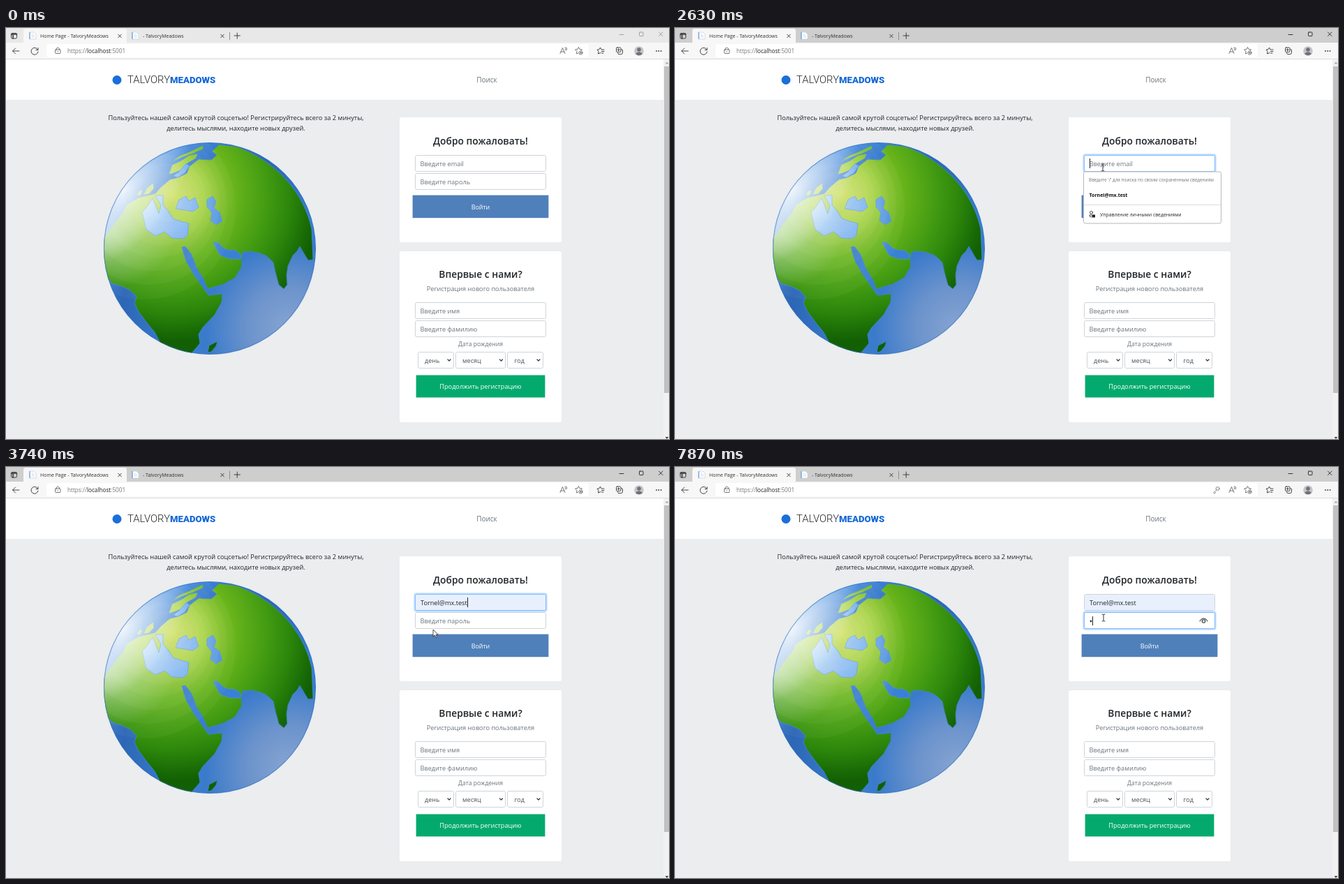
Write an HTML page that moves like this. It is 950 px wide and 589 px high and loops after 8 s.

```html
<!DOCTYPE html>
<html lang="ru">
<head>
<meta charset="utf-8">
<title>Home Page</title>
<style>
html, body { margin: 0; width: 100%; height: 100%; overflow: hidden; background: #fff; }
svg { display: block; width: 950px; height: 589px; }
text { font: 9.16px "Open Sans", "Noto Sans", sans-serif; fill: #212529; }
.mid { text-anchor: middle; }
.lead { font-size: 9.27px; }
.h { font-size: 13.8px; font-weight: 600; }
.grey, .ph { fill: #6c757d; }
.sel { fill: #495057; font-size: 9px; }
.tab { font-size: 7px; fill: #333; }
.box { fill: #fff; stroke: #ced4da; }
.ring { fill: none; stroke: #80bdff; }
.halo { fill: none; stroke: #007bff; stroke-opacity: .25; stroke-width: 1.8; }
.line { fill: none; stroke: #333; stroke-width: .9; stroke-linecap: round; stroke-linejoin: round; }
.caret { fill: #222; }

/* Everything switches on one shared eight-second clock. */
.k { animation: 8s step-end infinite; }
.strip { animation-name: strip; }
.caption { animation-name: caption; }
.arrow { animation-name: arrow; }
.beam { animation-name: beam; }
.glow { animation-name: glow; }
.pop { animation-name: pop; transform-origin: 684px 243px; }
.hover { animation-name: hover; }
.mailHint { animation-name: mailHint; }
.mailFill { animation-name: hover; }
.preview { animation-name: preview; }
.mail { animation-name: mail; }
.mailRing { animation-name: mailRing; }
.passRing { animation-name: passRing; }
.caretA { animation-name: caretA; }
.caretB { animation-name: caretB; }
.caretC { animation-name: caretC; }
.typed { animation-name: typed; }
.passHint { animation-name: passHint; }

@keyframes strip { 0% { fill: #e8e8e8 } 17.75%, 100% { fill: #cecece } }
@keyframes caption { 0% { stroke: #999 } 17.75%, 100% { stroke: #222 } }
@keyframes arrow {
  0% { opacity: 0; transform: translate(900px, 575px) }
  4.875% { opacity: 1; transform: translate(900px, 575px) }
  5.75% { opacity: 1; transform: translate(888px, 559px) }
  6.625% { opacity: 1; transform: translate(855px, 516px) }
  7.5% { opacity: 1; transform: translate(809px, 455px) }
  8.375% { opacity: 1; transform: translate(756px, 385px) }
  9.25% { opacity: 1; transform: translate(703px, 315px) }
  10.125% { opacity: 1; transform: translate(657px, 254px) }
  11% { opacity: 1; transform: translate(624px, 211px) }
  11.875% { opacity: 0; transform: translate(612px, 196px) }
  33.75% { opacity: 1; transform: translate(612px, 209px) }
  34.625% { opacity: 1; transform: translate(612px, 219px) }
  35.5% { opacity: 1; transform: translate(612px, 228px) }
  36.375% { opacity: 1; transform: translate(612px, 232px) }
  37.25% { opacity: 1; transform: translate(612px, 233px) }
  48.5%, 100% { opacity: 0; transform: translate(612px, 233px) }
}
@keyframes beam {
  0% { opacity: 0; transform: translate(613px, 196px) }
  11.875% { opacity: 1; transform: translate(613px, 196px) }
  32.875% { opacity: 1; transform: translate(613px, 200px) }
  33.75% { opacity: 0; transform: translate(613px, 200px) }
  48.5% { opacity: 1; transform: translate(613px, 226px) }
  49.375% { opacity: 1; transform: translate(614px, 220px) }
  50.25%, 100% { opacity: 1; transform: translate(614px, 216px) }
}
@keyframes glow {
  0% { opacity: 0; transform: translate(612px, 196px) }
  17.75% { opacity: 1; transform: translate(612px, 196px) }
  19.625% { opacity: 0; transform: translate(612px, 196px) }
  43.25% { opacity: 1; transform: translate(612px, 234px) }
  45% { opacity: 0; transform: translate(612px, 234px) }
  51.875% { opacity: 1; transform: translate(613px, 216px) }
  53.625%, 100% { opacity: 0; transform: translate(613px, 216px) }
}
@keyframes pop {
  0% { opacity: 0; transform: none }
  17.75% { opacity: 1; transform: none }
  45% { opacity: .66; transform: scale(.98) }
  45.875% { opacity: .2; transform: scale(.965) }
  46.75%, 100% { opacity: 0; transform: none }
}
@keyframes hover { 0% { opacity: 0 } 35.5%, 100% { opacity: 1 } }
@keyframes mailHint { 0% { opacity: 1 } 35.5%, 100% { opacity: 0 } }
@keyframes preview { 0% { opacity: 0 } 35.5% { opacity: 1 } 45%, 100% { opacity: 0 } }
@keyframes mail { 0% { opacity: 0 } 45%, 100% { opacity: 1 } }
@keyframes mailRing {
  0% { opacity: 0 } 18.625% { opacity: .5 } 19.625% { opacity: 1 }
  51.875% { opacity: .5 } 52.75% { opacity: .12 } 53.625%, 100% { opacity: 0 }
}
@keyframes passRing { 0% { opacity: 0 } 51.875% { opacity: .35 } 52.75% { opacity: .8 } 53.625%, 100% { opacity: 1 } }
@keyframes caretA {
  0% { opacity: 0 } 17.75% { opacity: 1 } 24.625% { opacity: 0 } 30.375% { opacity: 1 }
  38.125% { opacity: 0 } 43.25% { opacity: 1 } 45%, 100% { opacity: 0 }
}
@keyframes caretB { 0% { opacity: 0 } 45% { opacity: 1 } 51.875%, 100% { opacity: 0 } }
@keyframes caretC {
  0% { opacity: 0; transform: none } 51.875% { opacity: 1; transform: none }
  58.625% { opacity: 0; transform: none } 65.25% { opacity: 1; transform: none }
  71.875% { opacity: 0; transform: none } 78.5% { opacity: 1; transform: none }
  85.125% { opacity: 0; transform: none } 91.75% { opacity: 1; transform: none }
  98.375%, 100% { opacity: 1; transform: translate(4px, 0) }
}
@keyframes typed { 0% { opacity: 0 } 98.375%, 100% { opacity: 1 } }
@keyframes passHint { 0% { opacity: 1 } 98.375%, 100% { opacity: 0 } }
</style>
</head>
<body>
<svg viewBox="0 0 950 589">
<defs>
  <radialGradient id="sea" gradientUnits="userSpaceOnUse" cx="405" cy="430" r="300">
    <stop offset="0" stop-color="#86a4d2"/>
    <stop offset=".2" stop-color="#6b93cc"/>
    <stop offset=".4" stop-color="#3a7acb"/>
    <stop offset=".52" stop-color="#3a80d4"/>
    <stop offset=".8" stop-color="#2d66b5"/>
    <stop offset="1" stop-color="#3f87dc"/>
  </radialGradient>
  <radialGradient id="land" gradientUnits="userSpaceOnUse" cx="238" cy="238" r="212">
    <stop offset="0" stop-color="#c6dc48"/>
    <stop offset=".2" stop-color="#a3cf38"/>
    <stop offset=".42" stop-color="#68b41b"/>
    <stop offset=".62" stop-color="#469e13"/>
    <stop offset=".8" stop-color="#2c860b"/>
    <stop offset=".92" stop-color="#1b6e06"/>
    <stop offset="1" stop-color="#125f04"/>
  </radialGradient>
  <radialGradient id="lake" gradientUnits="userSpaceOnUse" cx="200" cy="250" r="130">
    <stop offset="0" stop-color="#b4d6fa"/>
    <stop offset=".5" stop-color="#78b0ee"/>
    <stop offset="1" stop-color="#3a80d4"/>
  </radialGradient>
  <radialGradient id="gloss" gradientUnits="userSpaceOnUse" cx="0" cy="0" r="1"
    gradientTransform="translate(168 232) rotate(-52) scale(125 70)">
    <stop offset="0" stop-color="#fff" stop-opacity=".9"/>
    <stop offset=".4" stop-color="#fff" stop-opacity=".55"/>
    <stop offset="1" stop-color="#fff" stop-opacity="0"/>
  </radialGradient>
  <radialGradient id="haze" gradientUnits="userSpaceOnUse" cx="0" cy="0" r="1"
    gradientTransform="translate(142 296) scale(100 78)">
    <stop offset="0" stop-color="#fff" stop-opacity=".5"/>
    <stop offset=".5" stop-color="#fff" stop-opacity=".25"/>
    <stop offset="1" stop-color="#fff" stop-opacity="0"/>
  </radialGradient>
  <clipPath id="ball"><circle cx="292" cy="316" r="152"/></clipPath>
  <path id="x" d="M-2.3-2.3 2.3 2.3M2.3-2.3-2.3 2.3"/>
  <path id="chev" class="line" d="M-2-1 0 1.2 2-1" style="stroke-width:1.2"/>
  <g id="doc">
    <path d="M-4-5H2L5-2V5H-4Z" fill="#fff" stroke="#c8ccd2" stroke-width=".7"/>
    <path d="M-4-5V5" stroke="#4a90d9"/><path d="M-1.5-2H1M-1.5 0H3M-1.5 2H3" stroke="#b9d3ee" stroke-width=".7"/>
  </g>
</defs>

<!-- browser frame -->
<rect class="k strip" width="950" height="21"/>
<path d="M25 21V4Q25 1 28 1H170Q173 1 173 4V21Z" fill="#f7f7f7"/>
<rect y="21" width="950" height="24" fill="#f7f7f7"/>
<path d="M0 44.5H950" stroke="#dcdcdc"/>
<g class="line">
  <rect x="7.5" y="7.5" width="8" height="7.5" rx="1.5"/><path d="M7.5 9H15.5M10 9V15" stroke-width="1.5"/>
  <use href="#x" x="163" y="11.5"/><use href="#x" x="310" y="11.5"/>
  <path d="M320.5 6V17" stroke="#888"/><path d="M327 11H335.5M331.25 7V15.25"/>
</g>
<use href="#doc" x="38" y="11"/><use href="#doc" x="185" y="11"/>
<text class="tab" x="49" y="13.5">Home Page - TalvoryMeadows</text>
<text class="tab" x="196" y="13.5">- TalvoryMeadows</text>
<g class="line k caption">
  <path d="M879 9.5H885"/><rect x="907.5" y="6" width="5.5" height="5.5" rx=".8"/>
  <path d="M935.5 6 941 11.5M941 6 935.5 11.5"/>
</g>
<rect x="58" y="23" width="777" height="19" rx="3" fill="#fff"/>
<g class="line">
  <path d="M19 33H9.5M13.5 29 9.5 33 13.5 37M45.5 31A5 5 0 1 0 46 34M46 28.5V31.5H43"/>
  <g stroke="#666"><rect x="70.5" y="31" width="7.5" height="5.5" rx="1"/><path d="M72 31V29.5Q74.25 26.5 76.5 29.5V31M74.25 33.5V34"/></g>
  <g stroke="#555" stroke-width=".8">
    <path d="M794 36.5 797.5 28.5 801 36.5M795.2 34H799.8M801 28Q803 29.5 801.5 31.5M802.5 27.5Q805 29.5 803 32"/>
    <path d="M824 32.5 825.5 31 822 30.5 820.5 27.5 819 30.5 815.5 31 818 33.5 817.5 37 819.5 36"/>
    <circle cx="823.5" cy="35.5" r="2.6"/><path d="M822.5 35.5H824.5M823.5 34.5V36.5"/>
  </g>
  <path d="M852 35.5 848.5 37 849 33.5 847 31.2 850 30.7 851.5 28 853 30.7M853.5 31H857M853.5 33.5H857M853.5 36H856"/>
  <rect x="874.5" y="28" width="6.5" height="6.5" rx="1.3"/>
  <path d="M882 30.5Q883.5 30.5 883.5 32V35.5Q883.5 37.5 881.5 37.5H878Q876.5 37.5 876.5 36M877.7 29.7V33M876 31.3H879.4"/>
</g>
<circle cx="907" cy="33" r="6.8" fill="#c7c4c9"/>
<circle cx="907" cy="31" r="2.8" fill="#736f77"/><path d="M902 37Q907 31.5 912 37Q907 41.5 902 37" fill="#736f77"/>
<g fill="#333"><circle cx="932" cy="33" r=".9"/><circle cx="935.3" cy="33" r=".9"/><circle cx="938.6" cy="33" r=".9"/></g>
<text x="88" y="35.7" style="font-size:8.2px;fill:#777">https://<tspan fill="#222">localhost</tspan>:5001</text>
<g class="line k typed" style="stroke:#666;stroke-width:.8"><circle cx="777.5" cy="31" r="2.5"/><path d="M775.7 32.8 772 36.5V37.5H773.8L774.8 36"/></g>

<!-- page -->
<rect y="45" width="943" height="58" fill="#fff"/>
<rect y="103" width="943" height="486" fill="#ebedef"/>
<rect x="942" y="45" width="8" height="544" fill="#f1f1f1"/>
<rect x="943" y="55" width="7" height="468" fill="#c1c1c1"/>
<path d="M944.5 51.5 947 48.5 949.5 51.5Z" fill="#aaa"/><path d="M944.5 586 947 589 949.5 586Z" fill="#444"/>
<circle cx="159" cy="74.5" r="6.5" fill="#1a6fd8"/>
<text x="235" y="79" text-anchor="end" style="font:300 14.8px Roboto,sans-serif">TALVORY</text>
<text x="235" y="79" style="font:900 13.2px Roboto,sans-serif;fill:#1468d6">MEADOWS</text>
<text class="mid grey" x="689" y="77.5" style="font-size:10px">Поиск</text>
<text class="mid lead" x="329.5" y="132">Пользуйтесь нашей самой крутой соцсетью! Регистрируйтесь всего за 2 минуты,</text>
<text class="mid lead" x="329.5" y="147">делитесь мыслями, находите новых друзей.</text>

<!-- globe -->
<g clip-path="url(#ball)">
  <circle cx="292" cy="316" r="152" fill="url(#sea)"/>
  <g fill="url(#land)" stroke="#3c86c8" stroke-width=".9" stroke-linejoin="round">
    <path d="M305 167 330 170C382 188 426 232 438 288L440 332 433 333 428 325 421 313 417 320 411 326 404 341 402 354 403 368 398 374 391 368 386 350 383 336 376 329 370 325 361 322 350 320 339 321 337 331 338 342 328 358 312 367 289 374 283 360 273 344 266 325 257 313 252 314 258 334 269 353 283 373 290 383 310 381 309 393 299 411 282 429 276 439 278 452 266 466 240 463 222 453 213 436 203 424 189 405 184 394 187 385 178 376 165 370 152 366 143 356 134 330 142 298 151 286 159 275 167 265 173 253 190 243 203 240 214 237 222 228 235 217 247 214 259 208 263 198 276 188 294 189 302 182 295 177Z"/>
    <path d="M233 210 238 196 251 190 263 182 275 180 272 187 258 195 250 204 243 207Z"/>
    <path d="M237 192 249 183 266 176 282 168 283 173 268 180 251 186Z"/>
    <path d="M197 239 202 229 211 222 212 230 205 238ZM187 239 192 232 196 234 192 241Z"/>
    <path d="M289 465 291 455 303 449 301 456 294 464Z"/>
  </g>
  <g fill="url(#lake)" stroke="#4a92dc" stroke-width=".7" stroke-linejoin="round">
    <path d="M195 264 201 258 210 244 214 253 219 266 222 254 214 240 225 240 225 254 233 263 239 273 250 277 262 280 260 297 254 302 238 301 227 292 214 298 201 289Z"/>
    <path d="M243 259 248 246 258 241 262 248 271 243 276 257 268 263 256 261Z"/>
    <path d="M288 246 296 241 301 249 298 258 306 264 310 277 301 282 293 276 295 265 288 256Z"/>
    <path d="M240 212 248 206 258 194 263 198 256 208 246 214Z"/>
    <path d="M297 308Q302 304 308 312 316 320 326 318 333 320 337 326L335 331 322 331Q312 328 307 326Z"/>
  </g>
  <g fill="#fff" fill-opacity=".035">
    <circle cx="236" cy="240" r="22"/><circle cx="232" cy="242" r="36"/><circle cx="227" cy="244" r="50"/>
    <circle cx="222" cy="246" r="65"/><circle cx="216" cy="249" r="80"/><circle cx="210" cy="252" r="96"/>
    <circle cx="204" cy="255" r="113"/><circle cx="198" cy="258" r="131"/>
  </g>
  <circle cx="292" cy="316" r="152" fill="url(#haze)"/>
  <circle cx="292" cy="316" r="152" fill="url(#gloss)"/>
</g>
<circle cx="292" cy="316" r="151.5" fill="none" stroke="#2f70bf" stroke-width="1.2" stroke-opacity=".55"/>

<!-- login card -->
<rect x="564" y="128" width="232" height="179" rx="2.5" fill="#fff"/>
<text class="mid h" x="680" y="166.5">Добро пожаловать!</text>
<rect class="box" x="586.5" y="182.5" width="187" height="23" rx="2"/>
<rect class="k mailFill" x="587" y="183" width="186" height="22" rx="1.5" fill="#e8f0fe"/>
<g class="k mailRing"><rect class="halo" x="585.2" y="181.2" width="189.6" height="25.6" rx="3"/><rect class="ring" x="586.5" y="182.5" width="187" height="23" rx="2"/></g>
<text class="ph k mailHint" x="593.5" y="198">Введите email</text>
<text class="k preview" x="594" y="197.8" style="font-size:7.75px;font-weight:500;fill:#111">Tornel@mx.test</text>
<text class="k mail" x="594" y="198">Tornel@mx.test</text>
<rect class="caret k caretA" x="594" y="187" width="1" height="14"/>
<rect class="caret k caretB" x="661" y="187" width="1" height="14"/>

<rect class="box" x="586.5" y="208.5" width="187" height="23" rx="2"/>
<g class="k passRing"><rect class="halo" x="585.2" y="207.2" width="189.6" height="25.6" rx="3"/><rect class="ring" x="586.5" y="208.5" width="187" height="23" rx="2"/></g>
<text class="ph k passHint" x="593.5" y="224.3">Введите пароль</text>
<rect class="caret k caretC" x="594" y="214" width="1" height="13"/>
<g class="k typed">
  <circle cx="596" cy="221" r="1.4" fill="#333"/>
  <path class="line" d="M752 221Q757.5 213 763 221" style="stroke-width:1.1"/><circle class="line" cx="757.5" cy="221" r="2.2" style="stroke-width:1.1"/>
</g>
<rect x="582.6" y="239.6" width="194.8" height="32.6" fill="#5080ba"/>
<text class="mid" x="680" y="259.5" style="font-size:8.9px;fill:#fff">Войти</text>

<!-- registration card -->
<rect x="564" y="320" width="232" height="245" rx="2.5" fill="#fff"/>
<text class="mid h" x="680" y="357.5">Впервые с нами?</text>
<text class="mid grey" x="680" y="377">Регистрация нового пользователя</text>
<rect class="box" x="586.5" y="393.5" width="187" height="23" rx="2"/>
<text class="ph" x="593.5" y="408.5">Введите имя</text>
<rect class="box" x="586.5" y="419.5" width="187" height="23" rx="2"/>
<text class="ph" x="593.5" y="434.7">Введите фамилию</text>
<text class="mid grey" x="680" y="456" style="font-size:8.65px">Дата рождения</text>
<rect class="box" x="590.5" y="464.5" width="51" height="23" rx="2"/>
<rect class="box" x="644.5" y="464.5" width="71" height="23" rx="2"/>
<rect class="box" x="718.5" y="464.5" width="51" height="23" rx="2"/>
<text class="sel" x="600" y="480">день</text><use href="#chev" x="635" y="476"/>
<text class="sel" x="654" y="480">месяц</text><use href="#chev" x="709.5" y="476"/>
<text class="sel" x="728.5" y="480">год</text><use href="#chev" x="763" y="476"/>
<rect x="587.6" y="497.5" width="184.8" height="32" fill="#04aa6d"/>
<text class="mid" x="680" y="517" style="fill:#fff">Продолжить регистрацию</text>

<!-- autofill popup -->
<g class="k pop">
  <rect x="585.5" y="206" width="197" height="74" rx="2.5" fill="#fff" stroke="#b8b8b8"/>
  <path d="M586 253.5H782" stroke="#ddd"/>
  <rect class="k hover" x="587.5" y="228" width="192" height="23" rx="1.5" fill="#e3effa" stroke="#8ab8de"/>
  <text x="593" y="219.5" style="font-size:6.4px;fill:#767676">Введите '/' для поиска по своим сохраненным сведениям</text>
  <text x="593.5" y="241.7" style="font-size:7px;font-weight:700;fill:#111">Tornel@mx.test</text>
  <text x="609" y="269.8" style="font-size:6.88px">Управление личными сведениями</text>
  <circle class="line" cx="596.5" cy="264.5" r="2"/><path class="line" d="M597 268H594Q593 270.5 596.5 271"/>
  <rect x="597.5" y="267.5" width="4.5" height="4" rx=".6" fill="#222"/>
</g>

<!-- pointer -->
<circle class="k glow" r="6.5" fill="#f7dc1e" fill-opacity=".72"/>
<path class="k arrow" d="M0 0V10L2.3 7.9 4 11.5 5.6 10.8 4 7.2H7Z" fill="#fff" stroke="#222" stroke-width=".8"/>
<path class="k beam" d="M-2.3-5Q0-5 0-4Q0-5 2.3-5M0-4V4M-2.3 5Q0 5 0 4Q0 5 2.3 5" fill="none" stroke="#333"/>
</svg>
</body>
</html>
```
